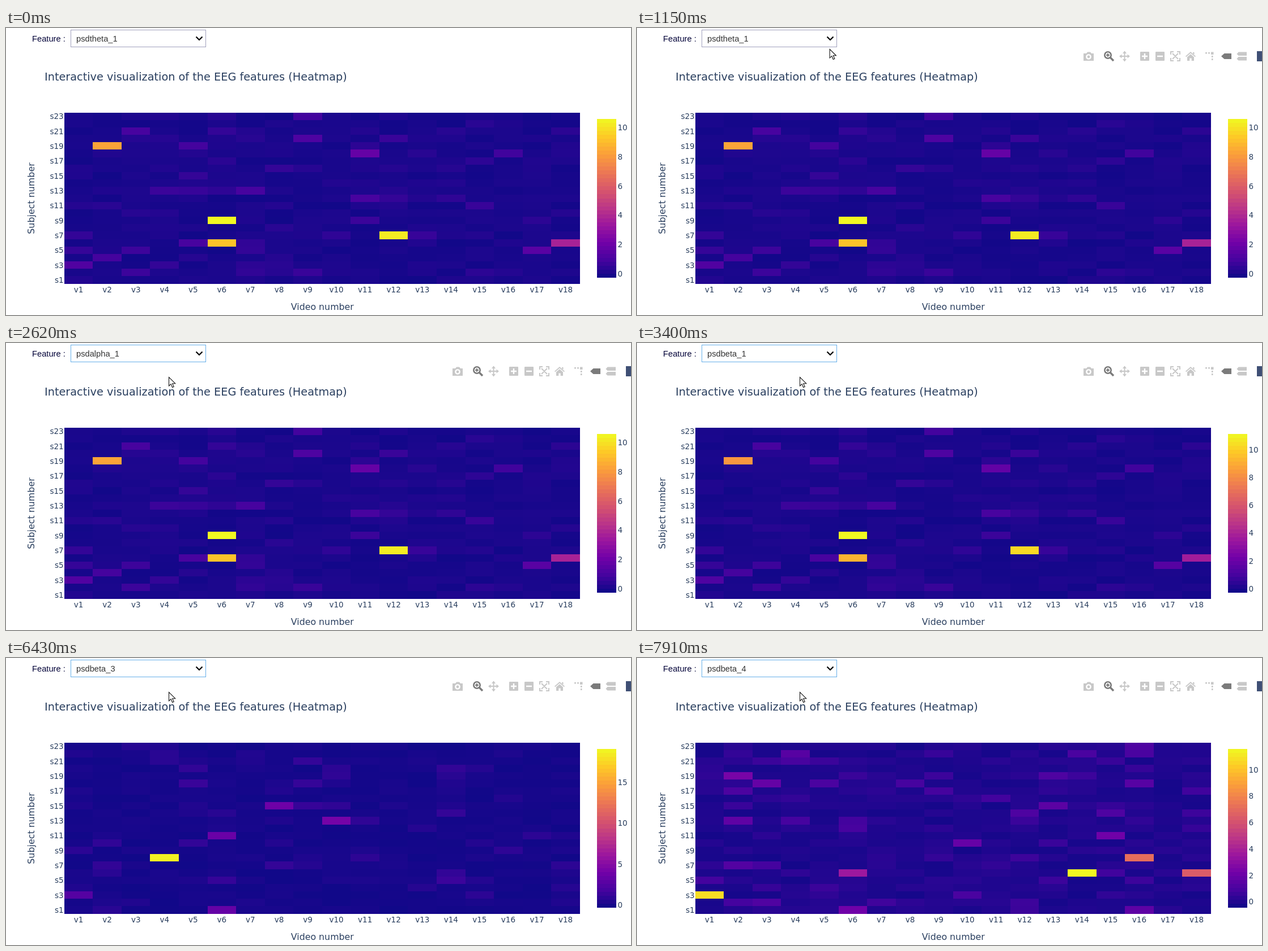
An HTML page for the animation above (8 s loop, 1103 by 508 pixels).

```html
<!DOCTYPE html>
<html lang="en">
<head>
<meta charset="utf-8">
<title>EEG feature heatmap</title>
<style>
  html, body { margin: 0; width: 100%; height: 100%; overflow: hidden; background: #fff; }
  svg { display: block; width: 1103px; height: 508px; }
  .plot { font-family: "DejaVu Sans", Verdana, sans-serif; font-size: 13.5px; fill: #2a3f5f; }
  .form { font-family: "Liberation Sans", Arial, sans-serif; font-size: 14.7px; fill: #333; }
  .crisp { shape-rendering: crispEdges; }
  .end { text-anchor: end; }
  .mid { text-anchor: middle; }
  .icons { fill: #c8c8c8; stroke: #c8c8c8; stroke-width: 0; }
  .icons .on { fill: #7b7b7b; stroke: #7b7b7b; }
  .icons .line { fill: none; stroke-width: 2; }
  .icons .cut { fill: none; stroke: #fff; stroke-width: 2.4; }
</style>
</head>
<body>
<svg viewBox="0 0 1103 508">
  <g class="form">
    <text x="46" y="24" fill="#000038">Feature :</text>
    <rect id="box" x="114.5" y="3.5" width="238" height="30" fill="#fff"/>
    <text id="value" x="124" y="24"></text>
    <path d="M335.5 15.5l5.5 5.5 5.5-5.5" fill="none" stroke="#000" stroke-width="2.2"/>
  </g>

  <g class="plot">
    <text x="68" y="93" font-size="19.3">Interactive visualization of the EEG features (Heatmap)</text>
    <text class="mid" x="558.3" y="499" font-size="15.8">Video number</text>
    <text class="mid" transform="translate(50 301.5) rotate(-90)" font-size="15.9">Subject number</text>
    <g id="cells" class="crisp"></g>
    <g id="axes"></g>
    <g id="bar" class="crisp"></g>
    <g id="ticks"></g>
  </g>

  <g id="icons" class="icons">
    <path d="M789 45h4l2-2.5h5l2 2.5h4v13h-18v-13z"/>
    <circle class="cut" cx="797" cy="51" r="3.6"/>
    <g class="on">
      <circle class="line" cx="831" cy="48" r="5.7" style="stroke-width:2.6"/>
      <path class="line" d="M828 48h6M831 45v6"/>
      <path class="line" d="M835 52l6 6" style="stroke-width:3.4"/>
    </g>
    <path class="line" d="M852 50h17M860.5 41.5v17"/>
    <path d="M860.5 40.5l3.5 4.5h-7zM860.5 59.5l3.5-4.5h-7zM851 50l4.5-3.5v7zM870 50l-4.5-3.5v7z"/>
    <rect x="888" y="42" width="16" height="16" rx="1"/>
    <path class="cut" d="M891 50h10M896 45v10"/>
    <rect x="915" y="42" width="16" height="16" rx="1"/>
    <path class="cut" d="M918 50h10"/>
    <path class="line" d="M945 45l10 10M955 45l-10 10M942 47v-5h5M953 42h5v5M958 53v5h-5M947 58h-5v-5"/>
    <path d="M977 42l9 8-1.2 1.2-7.8-6.8-7.8 6.8-1.2-1.2zM971 51.5l6-5.2 6 5.2V58h-4.3v-4.5h-3.4V58H971zM981 43h2.5v4l-2.5-2z"/>
    <path d="M1003 43h3v2.5h-3zM1008 43h3v2.5h-3zM1013 42.5h4.5v4.5h-4.5zM1014 49h2.5v3h-2.5zM1014 54h2.5v3h-2.5z"/>
    <path class="on" d="M1031 50l5.5-5H1049v10h-12.5z"/>
    <path d="M1058.5 46l3-3.5H1076V49h-14.5zM1058.5 54.5l3-3.5H1076v6.5h-14.5z"/>
    <rect x="1094" y="41" width="18" height="18" fill="#3f4f75"/>
  </g>

  <g id="list" class="form">
    <rect x="112" y="36" width="243" height="381" rx="2" opacity=".12"/>
    <rect x="114.5" y="33.5" width="238" height="381" fill="#fff" stroke="#555"/>
    <rect x="331" y="34" width="21" height="380" fill="#f1f1f1"/>
    <rect x="333" y="55" width="17" height="94" fill="#c1c1c1"/>
    <path d="M336.5 47.5h9l-4.5-5z" fill="#a3a3a3"/>
    <path d="M336.5 401.5h9l-4.5 5z" fill="#505050"/>
    <rect id="mark" x="115.8" width="214" height="17.5" fill="#1e90ff" stroke="#101020" stroke-width="1.6"/>
    <g id="options"></g>
  </g>

  <path id="cursor" d="M.5.5V16l3.6-3.4 2.5 5.9 2.6-1.1-2.5-5.7h5z" fill="#fff" stroke="#111" stroke-width="1.1"/>
</svg>
<script>
const LOOP = 8000, ROWS = 23, COLS = 18;
const LEFT = 102.8, TOP = 149.6, CELL_W = 910 / COLS, CELL_H = 303 / ROWS;
const BAR_TOP = 161, BAR_H = 281, BANDS = 40;
const ITEM_TOP = 34, ITEM_H = 19;
const OPEN_AT = 1462, PICK_AT = 2550;
const $ = id => document.getElementById(id);

function add(parent, tag, attrs, text = '') {
  const node = document.createElementNS(parent.namespaceURI, tag);
  for (const key in attrs) node.setAttribute(key, attrs[key]);
  node.textContent = text;
  return parent.appendChild(node);
}

// Rectangle with edges rounded to whole pixels, so neighbours meet without seams.
function addTile(parent, x, y, w, h, fill) {
  const [l, t, r, b] = [x, y, x + w, y + h].map(Math.round);
  return add(parent, 'rect', { x: l, y: t, width: r - l, height: b - t, fill });
}

const PLASMA = ['0d0887', '46039f', '7201a8', '9c179e', 'bd3786', 'd8576b', 'ed7953', 'fb9f3a', 'fdca26', 'f0f921']
  .map(hex => [0, 2, 4].map(i => parseInt(hex.slice(i, i + 2), 16)));

function plasma(level) {
  const pos = Math.min(1, Math.max(0, level)) * 9, i = Math.min(8, Math.floor(pos));
  return `rgb(${PLASMA[i].map((c, k) => Math.round(c + (PLASMA[i + 1][k] - c) * (pos - i)))})`;
}

function random(...seeds) {
  const n = Math.sin(seeds.reduce((sum, s) => sum * 7.31 + s, 1.7)) * 43758.5453;
  return n - Math.floor(n);
}

// Per electrode: theta maximum, its growth per band, background level, tick step
// and the strongest cells as subject-video: level, the rest being random.
const electrodes = [
  { max: 10.6, growth: 1.05, base: .025, step: 2, peaks: {
    '9-6': 1.06, '7-12': .97, '6-6': .87, '19-2': .79, '6-18': .37, '18-11': .19, '5-17': .16, '3-1': .14 } },
  { max: 14.57, growth: 1.05, base: .0065, step: 5, peaks: {
    '9-6': 1.06, '6-6': .78, '6-18': .44, '3-6': .24 } },
  { max: 19.1, growth: 1, base: .018, step: 5, peaks: {
    '8-4': .98, '13-10': .23, '15-8': .21, '11-6': .2, '1-6': .19, '3-1': .15 } },
  { max: 10.5, growth: 1.05, base: .039, step: 2, peaks: {
    '6-14': 1.1, '3-1': 1.03, '8-16': .69, '6-18': .63, '6-6': .37, '19-2': .26, '11-15': .24, '1-6': .24 } }
];
const bands = ['theta', 'alpha', 'beta'];
const option = i => `psd${bands[i % 3]}_${Math.floor(i / 3) + 1}`;

// When each feature in turn is chosen; its map is drawn a little later.
const choiceTimes = [0, PICK_AT, 3400, 3940, 4490, 4970, 5420, 5970, 6430, 6890, 7360, 7830];
const drawTimes = choiceTimes.map((at, i) => i === 0 ? 0 : at + (at === PICK_AT ? 380 : i % 3 ? 70 : 150));

// Pointer moves in hard steps, slowing towards each end point.
const STEP = 78;
const origin = { x: 640, y: 408 };
const moves = [
  { at: 300, steps: 11, x: 341, y: 40 },
  { at: 1150, steps: 6, x: 335, y: 27 },
  { at: 1840, steps: 8, x: 287, y: 60 }
];

function pointer(t) {
  const i = moves.findLastIndex(m => m.at <= t);
  if (i < 0) return null;
  const from = moves[i - 1] ?? origin, to = moves[i];
  const u = Math.min(1, (Math.floor((t - to.at) / STEP) + 1) / to.steps);
  const ease = 1 - (1 - u) ** 1.4;
  return { x: from.x + (to.x - from.x) * ease, y: from.y + (to.y - from.y) * ease };
}

const grid = [];
for (let s = 1; s <= ROWS; s++) {
  const y = TOP + (ROWS - s) * CELL_H;
  for (let v = 1; v <= COLS; v++)
    grid.push({ s, v, node: addTile($('cells'), LEFT + (v - 1) * CELL_W, y, CELL_W, CELL_H) });
  if (s % 2) add($('axes'), 'text', { class: 'end', x: 101.7, y: y + CELL_H / 2 + 5 }, 's' + s);
}
for (let v = 1; v <= COLS; v++)
  add($('axes'), 'text', { class: 'mid', x: LEFT + (v - .5) * CELL_W, y: 468 }, 'v' + v);
for (let i = 0; i < BANDS; i++)
  addTile($('bar'), 1043, BAR_TOP + i * BAR_H / BANDS, 34, BAR_H / BANDS, plasma(1 - (i + .5) / BANDS));
const options = Array.from({ length: 20 }, (_, i) =>
  add($('options'), 'text', { x: 124, y: ITEM_TOP + 14 + ITEM_H * i }, option(i)));

function drawMap(feature) {
  const index = Math.floor(feature / 3);
  const { max, growth, base, step, peaks } = electrodes[index];
  const scale = growth ** (feature % 3), top = max * scale, bottom = -base * top;
  for (const { s, v, node } of grid) {
    const peak = peaks[`${s}-${v}`];
    const faint = base * (.4 + random(index, s, v) + 4 * random(v, s, index) ** 10);
    node.setAttribute('fill', plasma(peak ? peak / scale : faint));
  }
  $('ticks').replaceChildren();
  for (let n = 0; n <= top; n += step) {
    const y = BAR_TOP + BAR_H * (top - n) / (top - bottom);
    add($('ticks'), 'text', { x: 1079.5, y: y + 4.8 }, n);
  }
}

const show = (id, on) => $(id).setAttribute('visibility', on ? 'visible' : 'hidden');
const start = performance.now();
let drawn;

function frame() {
  const t = (performance.now() - start) % LOOP;
  const feature = drawTimes.findLastIndex(at => at <= t);
  if (feature !== drawn) drawMap(drawn = feature);

  const open = t >= OPEN_AT && t < PICK_AT, tip = pointer(t);
  $('value').textContent = option(choiceTimes.findLastIndex(at => at <= t));
  $('box').setAttribute('stroke', t < OPEN_AT ? '#a0a0bd' : '#66afe9');
  show('list', open);
  show('icons', tip && tip.y > 36 && !open);
  show('cursor', tip);

  if (tip) {
    $('cursor').setAttribute('transform', `translate(${tip.x} ${tip.y})`);
    const hovered = Math.max(0, Math.floor((tip.y - ITEM_TOP) / ITEM_H));
    $('mark').setAttribute('y', ITEM_TOP + .8 + ITEM_H * hovered);
    options.forEach((node, i) => { node.style.fill = i === hovered ? '#fff' : '#333'; });
  }
  requestAnimationFrame(frame);
}
frame();
</script>
</body>
</html>
```
